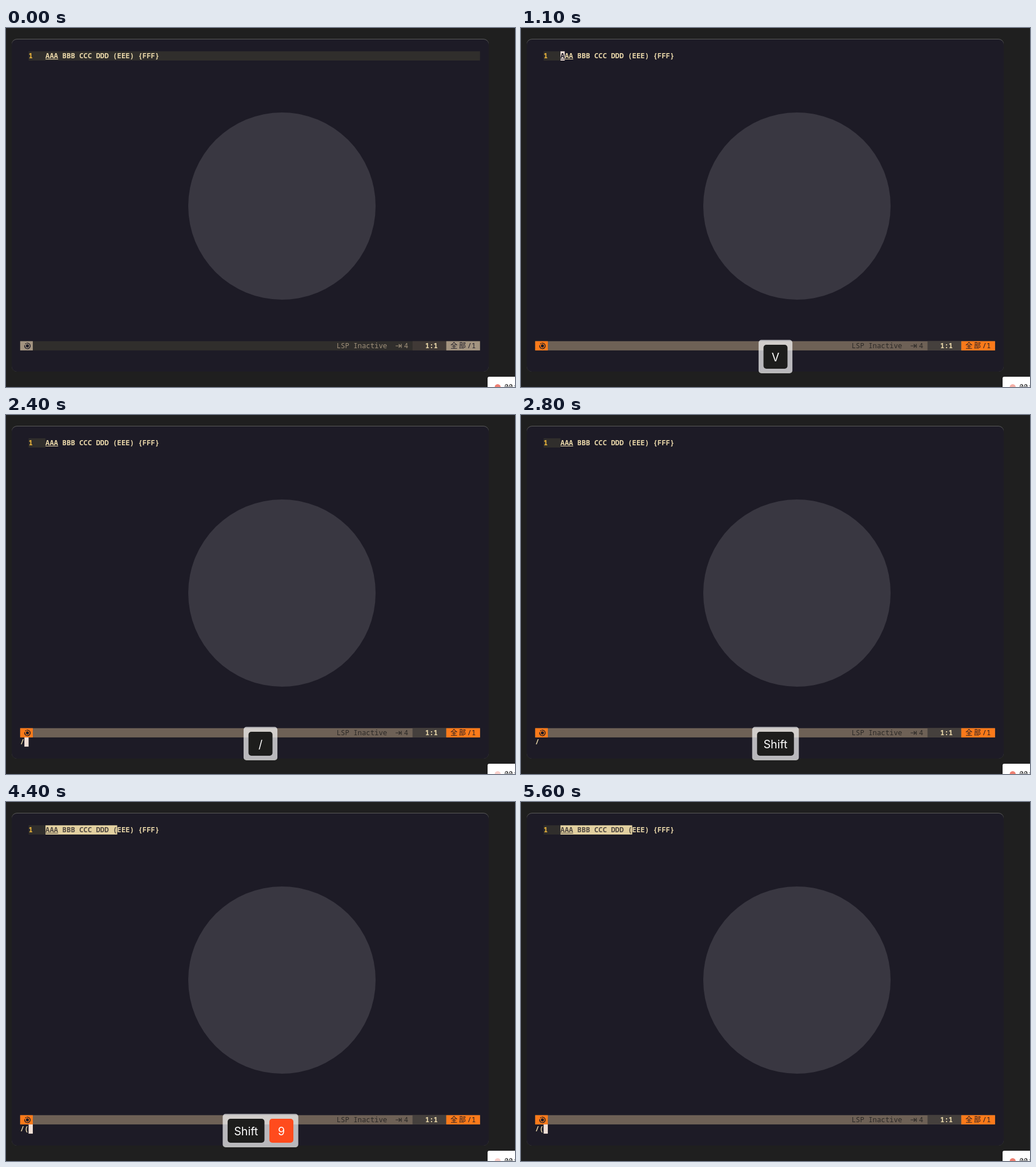
Write an HTML page that moves like this. It is 891 px wide and 629 px high and loops after 5.7 s.

```html
<!DOCTYPE html>
<html lang="en">
<head>
<meta charset="utf-8">
<title>Editor search selection</title>
<style>
html, body { margin: 0; width: 100%; height: 100%; overflow: hidden; background: #1f1f1f; }
svg { display: block; width: 891px; height: 629px; }
text { white-space: pre; }
.mono { font: 500 12.31px "Noto Sans Mono", "Noto Sans CJK SC", "Noto Sans CJK", monospace; }
.code { font-weight: 600; }
.key { font: 400 19.6px Inter, sans-serif; fill: #fff; text-anchor: middle; }
</style>
</head>
<body>
<svg id="stage" viewBox="0 0 891 629" xmlns="http://www.w3.org/2000/svg"></svg>
<script>
const LOOP = 5700, BLINK = 605, CELL = 7.385, LEFT = 24.8;
const LINE_Y = 40.8, STATUS_Y = 548.7, COMMAND_Y = 564.9, ROW = 16.2;
const VISUAL = 1100, SLASH = 1800, SHIFT = 2700, PAREN = 2900, KEYS_OFF = 5000;
const CODE = "AAA BBB CCC DDD (EEE) {FFF}";
const CREAM = "#ebd9ab", DARK = "#1d1b26", CURSOR = "#f0dfd6";
const stage = document.getElementById("stage");

const col = n => LEFT + n * CELL;

function add(tag, attrs, parent = stage, content = "") {
  const node = document.createElementNS("http://www.w3.org/2000/svg", tag);
  for (const name in attrs) node.setAttribute(name, attrs[name]);
  node.textContent = content;
  return parent.appendChild(node);
}
const box = (x, y, width, height, fill, parent, rx = 0) =>
  add("rect", { x, y, width, height, fill, rx }, parent);
const cells = (from, to, y, fill, parent) =>
  box(col(from), y, (to - from) * CELL, ROW, fill, parent);
const write = (n, y, content, fill, parent, style = "mono") =>
  add("text", { x: col(n), y: y + 12.5, fill, class: style }, parent, content);
const writeCode = (n, y, content, fill, parent) =>
  write(n, y, content, fill, parent, "mono code");
const underscore = (count, fill, parent) => box(col(6), 54, count * CELL, 1, fill, parent);
const show = (node, on) => node.setAttribute("visibility", on ? "inherit" : "hidden");

function buildWindow() {
  box(0, 0, 891, 629, "#1f1f1f");
  box(10, 19, 835, 583, "#5a5a5a", stage, 9);
  box(10, 20, 835, 582, DARK, stage, 9);
  add("circle", { cx: 483, cy: 312, r: 164, fill: "#393741" });
}

function buildStatus(accent, middle, muted, ruler) {
  const g = add("g", {});
  const y = STATUS_Y;
  cells(0, 109, y, middle, g);
  cells(0, 3, y, accent, g);
  cells(93, 101, y, ruler, g);
  cells(101, 109, y, accent, g);
  add("circle", { cx: 37.5, cy: 557, r: 4.9, fill: "none", stroke: DARK,
    "stroke-width": 1.4, "stroke-dasharray": "25 2 2 2", transform: "rotate(-105 37.5 557)" }, g);
  add("circle", { cx: 37.5, cy: 557, r: 2.7, fill: DARK }, g);
  write(75, y, "LSP Inactive", muted, g);
  add("path", { d: "M682 557h8.5m-3-3l3 3l-3 3M692 553.5v7", fill: "none",
    stroke: muted, "stroke-width": 1.2 }, g);
  write(91, y, "4", muted, g);
  writeCode(96, y, "1:1", CREAM, g);
  write(102, y, "全", DARK, g);
  write(104, y, "部", DARK, g);
  write(106, y, "/1", DARK, g);
  return g;
}

function buildKeys(keys) {
  const g = add("g", {}), gap = 8.6;
  const total = keys.reduce((sum, key) => sum + key.width + gap, gap);
  let x = 445.5 - total / 2;
  box(x, 546.5, total, 58.5, "#fff", g, 5).setAttribute("fill-opacity", 0.69);
  x += gap;
  for (const { label, width, fill = "#1d1d1c" } of keys) {
    box(x, 555, width, 42, fill, g, 5);
    add("text", { x: x + width / 2, y: 583.5, class: "key" }, g, label);
    x += width + gap;
  }
  return g;
}

buildWindow();
const lineBand = cells(2, 109, LINE_Y, "#302e2c");
writeCode(2, LINE_Y, "1", "#efb73b");
writeCode(6, LINE_Y, CODE, CREAM);
const underline = underscore(3, CREAM);

const selection = add("g", {});
cells(6, 23, LINE_Y, "#e2d0a0", selection);
writeCode(6, LINE_Y, CODE.slice(0, 17), "#504840", selection);
underscore(3, "#504840", selection);

const textCursor = add("g", {});
cells(6, 7, LINE_Y, CURSOR, textCursor);
writeCode(6, LINE_Y, "A", DARK, textCursor);
underscore(1, DARK, textCursor);

const normalStatus = buildStatus("#a39480", "#302e2c", "#a0917b", "#403936");
const visualStatus = buildStatus("#fc7a1a", "#6e6156", "#2b2826", "#45403d");
const command = writeCode(0, COMMAND_Y, "", CREAM);
const commandCursor = box(0, COMMAND_Y, CELL, ROW, CURSOR);

const shiftKey = { label: "Shift", width: 64.5 };
const keySets = [
  { from: VISUAL, to: SLASH, node: buildKeys([{ label: "V", width: 42 }]) },
  { from: SLASH, to: SHIFT, node: buildKeys([{ label: "/", width: 42 }]) },
  { from: SHIFT, to: PAREN, node: buildKeys([shiftKey]) },
  { from: PAREN, to: KEYS_OFF, node: buildKeys([shiftKey, { label: "9", width: 42, fill: "#ff4b1d" }]) }
];

box(843, 611, 60, 40, "#fff", stage, 3);
const recordDot = add("circle", { cx: 860.7, cy: 629.3, r: 5.2, fill: "#ee8072" });
add("text", { x: 872.5, y: 633, fill: "#222", class: "mono" }, stage, "00:00");

// The cursor restarts its blink at every keystroke.
function cursorLit(t) {
  const start = [PAREN, SLASH, VISUAL].find(key => t >= key);
  return start === undefined ? t >= 200 && t < 800 : Math.floor((t - start) / BLINK) % 2 === 0;
}

function render(now) {
  const t = now % LOOP;
  const visual = t >= VISUAL, searching = t >= SLASH, found = t >= PAREN;
  const lit = cursorLit(t);
  const typed = found ? "/(" : searching ? "/" : "";

  lineBand.setAttribute("width", (visual ? 4 : 107) * CELL);
  show(normalStatus, !visual);
  show(visualStatus, visual);
  show(selection, found);
  show(underline, !found);
  show(textCursor, lit && !searching);
  show(commandCursor, lit && searching);
  commandCursor.setAttribute("x", col(typed.length));
  command.textContent = typed;
  for (const { from, to, node } of keySets) show(node, t >= from && t < to);

  const pulse = Math.max(0, Math.sin(Math.PI * (t % 1000) / 600));
  recordDot.setAttribute("opacity", 1 - 0.73 * pulse);
}

function tick(now) {
  render(now);
  requestAnimationFrame(tick);
}
render(0);
requestAnimationFrame(tick);
</script>
</body>
</html>
```
